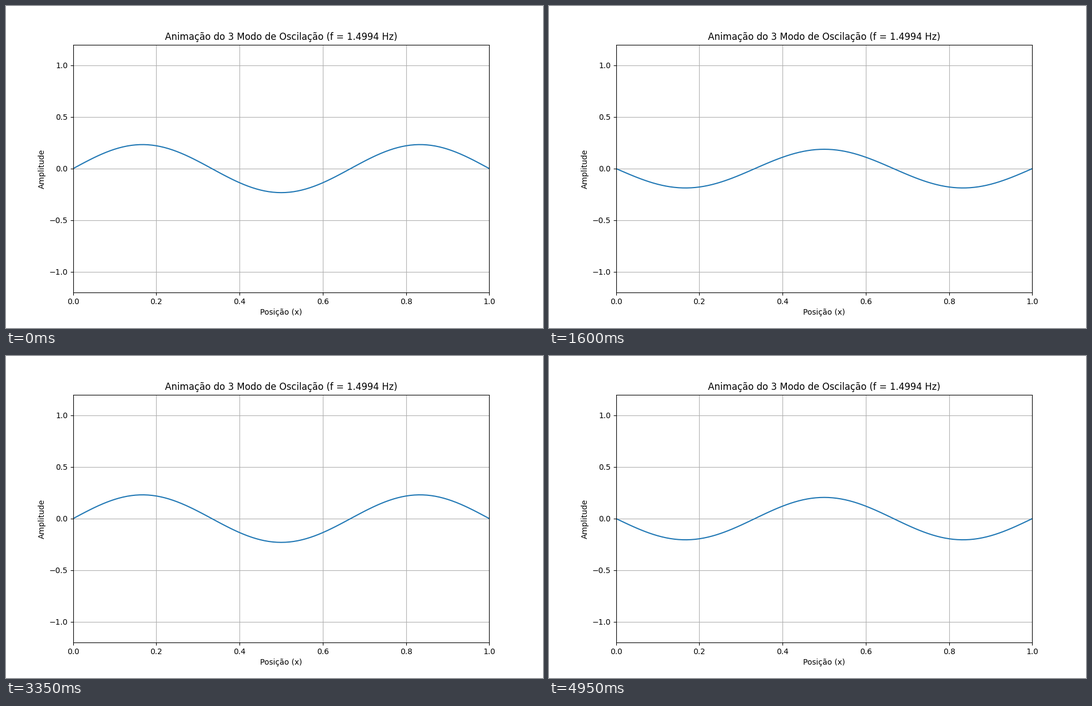
These frames come from a looping animation (966 by 580 pixels, 5000 ms). A matplotlib script:

```python
import numpy as np
import matplotlib.pyplot as plt
from matplotlib.animation import FuncAnimation

MODE = 3
FREQ = 1.4994       # Hz
PEAK = 0.2325
FRAMES = 100
INTERVAL = 50       # ms

plt.rcParams["font.family"] = "DejaVu Sans"

x = np.linspace(0, 1, 101)
shape = PEAK * np.sin(MODE * np.pi * x)

fig, ax = plt.subplots(figsize=(9.66, 5.8), dpi=100)
line, = ax.plot(x, shape)
ax.set_xlim(0, 1)
ax.set_ylim(-1.2, 1.2)
ax.set_title(f"Animação do {MODE} Modo de Oscilação (f = {FREQ:.4f} Hz)")
ax.set_xlabel("Posição (x)")
ax.set_ylabel("Amplitude")
ax.grid(True)


def update(frame):
    t = frame * INTERVAL / 1000
    line.set_ydata(shape * np.cos(2 * np.pi * FREQ * t))
    return line,


anim = FuncAnimation(fig, update, frames=FRAMES, interval=INTERVAL, repeat=True)
plt.show()
```
